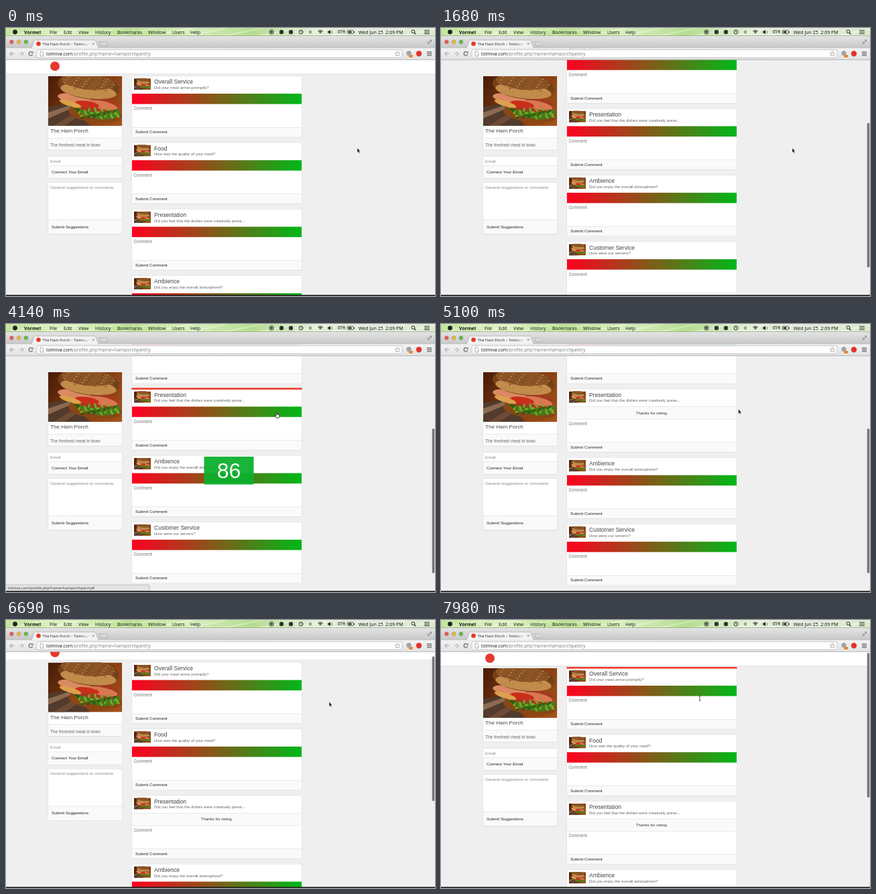
Recreate the animation shown at these times as an HTML page with a canvas. Size 640 px wide and 400 px high, loop 8 s.

```html
<!DOCTYPE html>
<html lang="en">
<head>
<meta charset="utf-8">
<title>Rating page</title>
<style>
  html, body { margin: 0; width: 100%; height: 100%; overflow: hidden; background: #efefef; }
  canvas { display: block; width: 640px; height: 400px; }
</style>
</head>
<body>
<canvas id="stage" width="640" height="400"></canvas>
<script>
const ctx = document.getElementById('stage').getContext('2d');
const LOOP = 8000, RATED_AT = 4650, VIEW_TOP = 47.5;
const SANS = '"Liberation Sans", Arial, sans-serif';
const UI = '"Open Sans", "Noto Sans", sans-serif';
const PLACE = 'The Ham Porch', SITE = 'Tolmiva', HOST = 'tolmiva.com';
const PATH = '/profile.php?name=hamporchpantry';
const CARD = { x: 188, w: 253, h: 90.5, gap: 8.8, bar: 26, barH: 15.5, thanksH: 18.5 };
const QUESTIONS = [
  ['Overall Service', 'Did your meal arrive promptly?'],
  ['Food', 'How was the quality of your meal?'],
  ['Presentation', 'Did you feel that the dishes were creatively prese...'],
  ['Ambience', 'Did you enjoy the overall atmosphere?'],
  ['Customer Service', 'How were our servers?']
];
const SCROLL = [[350, 0], [700, 25], [1300, 115], [1680, 150], [2050, 173.3],
  [5650, 173.3], [6030, 142], [6300, 80], [6690, 8.5], [6780, 0]];
const POINTER = [[1950, 524, 179], [2600, 352, 134], [3030, 363, 138], [4140, 405, 132],
  [4750, 405, 132], [5450, 482, 122], [6900, 482, 122], [7900, 386, 117]];

const clamp = v => Math.max(0, Math.min(1, v));
const mix = (a, b, k) => a + (b - a) * k;
const linear = k => k;
const smooth = k => k * k * (3 - 2 * k);

// Values of a keyframe track at time t.
function track(keys, t, ease) {
  const next = keys.findIndex(key => key[0] > t);
  if (next === 0) return keys[0].slice(1);
  if (next < 0) return keys[keys.length - 1].slice(1);
  const a = keys[next - 1], b = keys[next];
  const k = ease((t - a[0]) / (b[0] - a[0]));
  return a.slice(1).map((v, i) => mix(v, b[i + 1], k));
}

function rect(x, y, w, h, fill) {
  ctx.fillStyle = fill;
  ctx.fillRect(x, y, w, h);
}

function round(x, y, w, h, r, fill, stroke) {
  ctx.beginPath();
  ctx.roundRect(x, y, w, h, r);
  paint(fill, stroke);
}

function paint(fill, stroke, width = 0.7) {
  if (fill) { ctx.fillStyle = fill; ctx.fill(); }
  if (stroke) { ctx.strokeStyle = stroke; ctx.lineWidth = width; ctx.stroke(); }
}

function disc(x, y, r, fill, stroke, width) {
  ctx.beginPath();
  ctx.arc(x, y, r, 0, 7);
  paint(fill, stroke, width);
}

function shape(points, fill, stroke, width) {
  ctx.beginPath();
  points.forEach(([x, y]) => ctx.lineTo(x, y));
  if (fill) ctx.closePath();
  paint(fill, stroke, width);
}

function text(str, x, y, size, color, family = SANS, weight = '', align = 'left') {
  ctx.font = `${weight} ${size}px ${family}`;
  ctx.fillStyle = color;
  ctx.textAlign = align;
  ctx.fillText(str, x, y);
  return ctx.measureText(str).width;
}

function gradient(x0, y0, x1, y1, ...colors) {
  const g = ctx.createLinearGradient(x0, y0, x1, y1);
  colors.forEach((c, i) => g.addColorStop(i / (colors.length - 1), c));
  return g;
}

// A sandwich on a wooden table, drawn on a 110 x 74 sheet.
function photo(x, y, w, h) {
  ctx.save();
  ctx.beginPath();
  ctx.rect(x, y, w, h);
  ctx.clip();
  ctx.translate(x, y);
  ctx.scale(w / 110, h / 74);
  rect(0, 0, 110, 74, gradient(0, 0, 110, 74, '#471c06', '#7d3a10', '#a8521a'));
  shape([[0, 46], [34, 40], [62, 74], [0, 74]], '#523a2c');
  shape([[0, 54], [30, 44], [35, 48], [0, 63]], '#8b6a50');
  shape([[8, 74], [40, 54], [46, 60], [24, 74]], '#6d4b35');
  const blob = (cx, cy, rx, ry, turn, fill) => {
    ctx.beginPath();
    ctx.ellipse(cx, cy, rx, ry, turn, 0, 7);
    paint(fill);
  };
  blob(70, 56, 40, 13, 0.12, '#8a4614');
  blob(72, 49, 36, 14, 0.2, '#47791a');
  blob(62, 39, 44, 13, 0.16, '#a23a22');
  blob(39, 33, 25, 7, 0.15, '#d98a62');
  blob(80, 43, 24, 6, 0.2, '#d97850');
  blob(58, 42, 18, 5, 0.15, '#c92d1c');
  blob(33, 41, 17, 4, 0.3, '#dda14a');
  blob(60, 15, 46, 19, 0.12, '#73401a');
  blob(60, 22, 42, 11, 0.12, '#c18b4c');
  blob(59, 8, 40, 12, 0.1, '#8b5425');
  for (let i = 0; i < 42; i++) {
    const px = 22 + i * 37 % 77, py = 1 + i * 23 % 21;
    rect(px, py, 2, 1, i % 2 ? '#d2a160' : '#60330f');
  }
  for (let i = 0; i < 28; i++) {
    blob(42 + i * 29 % 63, 49 + i * 17 % 14, 3, 1.6, i, i % 3 ? '#76a928' : '#2e5912');
  }
  ctx.restore();
}

function panel(x, y, w, h) {
  rect(x - 0.5, y - 0.5, w + 1, h + 1.4, '#dcdcdc');
  rect(x, y, w, h, '#fff');
}

function button(label, x, y, w, h) {
  rect(x, y, w, h, '#fafafa');
  rect(x, y, w, 0.7, '#e2e2e2');
  text(label, x + 5, y + h / 2 + 2.2, 6.2, '#222');
}

function sidebar(y) {
  const x = 63, w = 110;
  panel(x, y, w, 109.5);
  photo(x, y, w, 74);
  text(PLACE, x + 3, y + 84, 8.1, '#444');
  rect(x, y + 92, w, 17.5, '#fafafa');
  rect(x, y + 92, w, 0.7, '#e2e2e2');
  text('The freshest meat in town', x + 3, y + 105.3, 6.5, '#666');
  panel(x, y + 120, w, 32);
  text('Email', x + 3, y + 128.7, 6.2, '#888');
  button('Connect Your Email', x, y + 133, w, 19);
  panel(x, y + 159, w, 76);
  text('General suggestions or comments', x + 3, y + 167.6, 6.2, '#888');
  button('Submit Suggestions', x, y + 214, w, 21);
}

function card([title, question], y, h, hovered, rated) {
  const { x, w, bar, barH, thanksH } = CARD;
  panel(x, y, w, h);
  if (hovered) rect(x - 0.5, y - 2, w + 1, 2.6, '#ee3b2e');
  photo(x + 3, y + 3.3, 25, 17);
  text(title, x + 33, y + 11.4, 8.55, '#444');
  text(question, x + 33, y + 19.1, 6, '#666');
  if (rated) {
    rect(x, y + bar, w, thanksH, '#fafafa');
    rect(x, y + bar, w, 0.7, '#e2e2e2');
    rect(x, y + bar + thanksH, w, 0.7, '#e2e2e2');
    text('Thanks for rating.', x + w / 2, y + bar + 11.2, 6.1, '#333', SANS, '', 'center');
  } else {
    rect(x, y + bar, w, barH, gradient(x, 0, x + w, 0, '#ff0020', '#7e5d18', '#00b818'));
  }
  const below = y + bar + (rated ? thanksH : barH);
  text('Comment', x + 2.5, below + 8.9, 6.3, '#777');
  button('Submit Comment', x, below + 34.5, w, 14.5);
}

function layoutCards(scroll, rated) {
  let y = 72 - scroll;
  return QUESTIONS.map((question, i) => {
    const done = rated && i === 2;
    const h = CARD.h + (done ? CARD.thanksH - CARD.barH : 0);
    const box = { question, y, h, done };
    y += h + CARD.gap;
    return box;
  });
}

// What the pointer is over: the card and the part of it.
function hover(cards, px, py) {
  const inside = px >= CARD.x && px < CARD.x + CARD.w;
  const box = inside && cards.find(c => py >= c.y && py < c.y + c.h);
  if (!box) return {};
  const barEnd = CARD.bar + (box.done ? CARD.thanksH : CARD.barH), dy = py - box.y;
  let zone = 'card';
  if (dy >= CARD.bar && dy < barEnd) zone = box.done ? 'card' : 'rating';
  else if (dy >= barEnd && dy < barEnd + 34.5) zone = 'comment';
  return { box, zone };
}

function popup(px) {
  const score = Math.round((px - CARD.x) / CARD.w * 100);
  const k = (score - 69) / 17;
  const channel = (a, b) => Math.round(255 * clamp(mix(a, b, k) / 255));
  rect(295.5, 198, 74, 41.5, `rgba(${channel(48, 12)},${channel(138, 176)},${channel(40, 46)},.94)`);
  text(score, 332.5, 230.3, 32, '#fff', SANS, '', 'center');
}

function pointer(x, y, zone) {
  ctx.save();
  ctx.translate(x, y);
  if (zone === 'rating') {
    shape([[-2, 0], [-0.7, 0], [-0.5, 3], [3, 3.8], [3, 6], [2, 8.2], [-2, 8.2], [-4, 5], [-2, 5.2]],
      '#fff', '#222', 0.8);
  } else if (zone === 'comment') {
    shape([[-1.5, -3.7], [0, -3], [1.5, -3.7]], null, '#333', 0.8);
    shape([[0, -3], [0, 3]], null, '#333', 0.8);
    shape([[-1.5, 3.7], [0, 3], [1.5, 3.7]], null, '#333', 0.8);
  } else {
    shape([[0, 0], [0, 7], [1.5, 5.7], [2.5, 8], [3.7, 7.4], [2.7, 5.2], [4.5, 5]], '#111', '#fff', 0.5);
  }
  ctx.restore();
}

function menuBar() {
  rect(0, 0, 640, 12, gradient(0, 0, 640, 0,
    '#c3e59e', '#e0f3c6', '#bce394', '#d9efc0', '#b5dd91', '#e2efd6', '#e3eadc', '#dcebcf'));
  for (let i = 0; i < 12; i++) {
    const x = i * 53;
    shape([[x, 12], [x + 60, 0], [x + 68, 0], [x + 14, 12]], 'rgba(255,255,255,.3)');
  }
  rect(0, 11.3, 640, 0.7, '#93a585');
  disc(13.5, 6, 3.4, '#222');
  text('Vormel', 27, 8.5, 7, '#111', UI, 'bold');
  [['File', 65], ['Edit', 86], ['View', 108], ['History', 133], ['Bookmarks', 166],
    ['Window', 212], ['Users', 248], ['Help', 275]].forEach(([s, x]) => text(s, x, 8.5, 7, '#111', UI));
  disc(396, 6, 3, null, '#222', 1);
  disc(396, 6, 1.4, '#222');
  disc(411, 6, 3.2, '#333');
  disc(425, 6, 3.2, '#333');
  disc(440, 6, 3, null, '#222', 0.9);
  shape([[440, 4], [440, 6], [441.5, 6.7]], null, '#222', 0.7);
  disc(454, 6, 2.4, '#98a28f');
  [1.4, 3.2, 5].forEach(r => {
    ctx.beginPath();
    ctx.arc(469, 8.7, r, -2.3, -0.84);
    paint(null, '#222', 1.1);
  });
  shape([[480, 4.7], [481.7, 4.7], [484, 2.7], [484, 9.3], [481.7, 7.3], [480, 7.3]], '#222');
  ctx.beginPath();
  ctx.arc(484, 6, 2.6, -0.9, 0.9);
  paint(null, '#222');
  text('65%', 494.5, 8.4, 6.2, '#111', UI);
  round(509.5, 3.6, 9, 4.8, 0.7, null, '#222');
  rect(510.7, 4.8, 4.8, 2.4, '#222');
  rect(519, 5, 0.9, 2, '#222');
  text('Wed Jun 25  2:09 PM', 526, 8.5, 7, '#111', UI);
  disc(607.5, 5.3, 2.4, null, '#222', 1);
  shape([[609.2, 7], [611.5, 9.3]], null, '#222', 1.2);
  [3.2, 5.6, 8].forEach(y => rect(624, y, 8, 0.9, '#222'));
}

function tabStrip() {
  rect(0, 12, 640, 18.5, gradient(0, 12, 0, 30, '#e4e4e4', '#c6c6c6'));
  ['#ee5b50', '#f2b93b', '#62bc47'].forEach((c, i) => disc(8.3 + i * 10.8, 20.7, 2.9, c, '#777', 0.4));
  shape([[38, 30.5], [42.5, 18], [133, 18], [138.5, 30.5]], '#f3f3f3', '#a5a5a5', 0.6);
  disc(48.5, 23.5, 3.3, '#e5392e');
  ctx.save();
  ctx.beginPath();
  ctx.rect(54, 18, 71, 12);
  ctx.clip();
  text(`${PLACE} – ${SITE} Feedback`, 54.5, 25.8, 5.7, gradient(112, 0, 125, 0, '#222', 'rgba(34,34,34,0)'), UI);
  ctx.restore();
  shape([[128.7, 21.8], [131.9, 25]], null, '#777', 0.8);
  shape([[131.9, 21.8], [128.7, 25]], null, '#777', 0.8);
  shape([[139, 20.5], [149, 20.5], [152, 26.5], [142, 26.5]], '#d8d8d8', '#a5a5a5', 0.6);
  shape([[630, 22.5], [634, 18.5]], null, '#777', 1);
  shape([[632, 18], [634.5, 18], [634.5, 20.5]], null, '#777', 0.8);
  shape([[629.5, 20.5], [629.5, 23], [632, 23]], null, '#777', 0.8);
}

function arrow(x, dir, color) {
  shape([[x - 3.2 * dir, 38.3], [x + 3.2 * dir, 38.3]], null, color, 1.4);
  shape([[x, 35.2], [x + 3.2 * dir, 38.3], [x, 41.4]], null, color, 1.4);
}

function toolbar() {
  rect(0, 30.3, 640, 17, gradient(0, 30, 0, 47, '#f3f3f3', '#e3e3e3'));
  rect(0, 46.8, 640, 0.8, '#a9a9a9');
  arrow(9, -1, '#b7b7b7');
  arrow(23, 1, '#c4c4c4');
  ctx.beginPath();
  ctx.arc(37, 38.3, 2.8, 0.3, 5.3);
  paint(null, '#666', 1.2);
  shape([[37.8, 37.4], [40.6, 37.4], [40.6, 34.6]], '#666');
  round(46, 32.4, 545, 12, 1.8, '#fff', '#b0b0b0');
  shape([[51, 35], [54, 35], [55.6, 36.6], [55.6, 42], [51, 42]], '#fff', '#888', 0.7);
  const hostWidth = text(HOST, 60, 40.7, 6.85, '#111', UI);
  text(PATH, 60 + hostWidth, 40.7, 6.85, '#777', UI);
  const star = Array.from({ length: 11 }, (_, i) => {
    const a = i * Math.PI / 5 - Math.PI / 2, r = i % 2 ? 1.8 : 4.2;
    return [584 + r * Math.cos(a), 38.6 + r * Math.sin(a)];
  });
  shape(star, '#fff', '#999', 0.7);
  disc(601, 37.7, 3.6, '#9aa4ac');
  rect(601, 40, 6, 4, '#e78b34');
  disc(616, 38.3, 4.2, '#e0352d');
  [35.2, 37.7, 40.2].forEach(y => rect(628, y, 7, 1.3, '#666'));
}

function draw(t) {
  const [scroll] = track(SCROLL, t, linear);
  const [px, py] = track(POINTER, t, smooth);
  const cards = layoutCards(scroll, t >= RATED_AT);
  const { box, zone } = hover(cards, px, py);

  rect(0, 0, 640, 400, '#efefef');
  rect(0, VIEW_TOP, 640, 20.5 - scroll, scroll < 20.5 ? '#fff' : '#efefef');
  if (scroll < 20.5) rect(0, 68 - scroll, 640, 0.6, '#e0e0e0');
  disc(73, 57 - scroll, 7, '#e5392e');
  sidebar(scroll < 21 ? 72 - scroll : 72);
  cards.forEach(c => card(c.question, c.y, c.h, c === box, c.done));
  if (t >= 350) round(635.7, 49 + scroll * 0.617, 3.6, 216, 1.8, '#777');
  if (zone === 'rating') {
    popup(px);
    round(-1, 389.3, 215, 10, [0, 2, 0, 0], '#e4e4e4', '#b0b0b0');
    text(`${HOST}${PATH}#`, 2.5, 396, 5.55, '#333', UI);
  }
  rect(0, 398.3, 640, 1.7, '#24241f');

  menuBar();
  tabStrip();
  toolbar();
  pointer(px, py, zone);
}

const start = performance.now();
function frame() {
  draw((performance.now() - start) % LOOP);
  requestAnimationFrame(frame);
}
frame();
</script>
</body>
</html>
```
